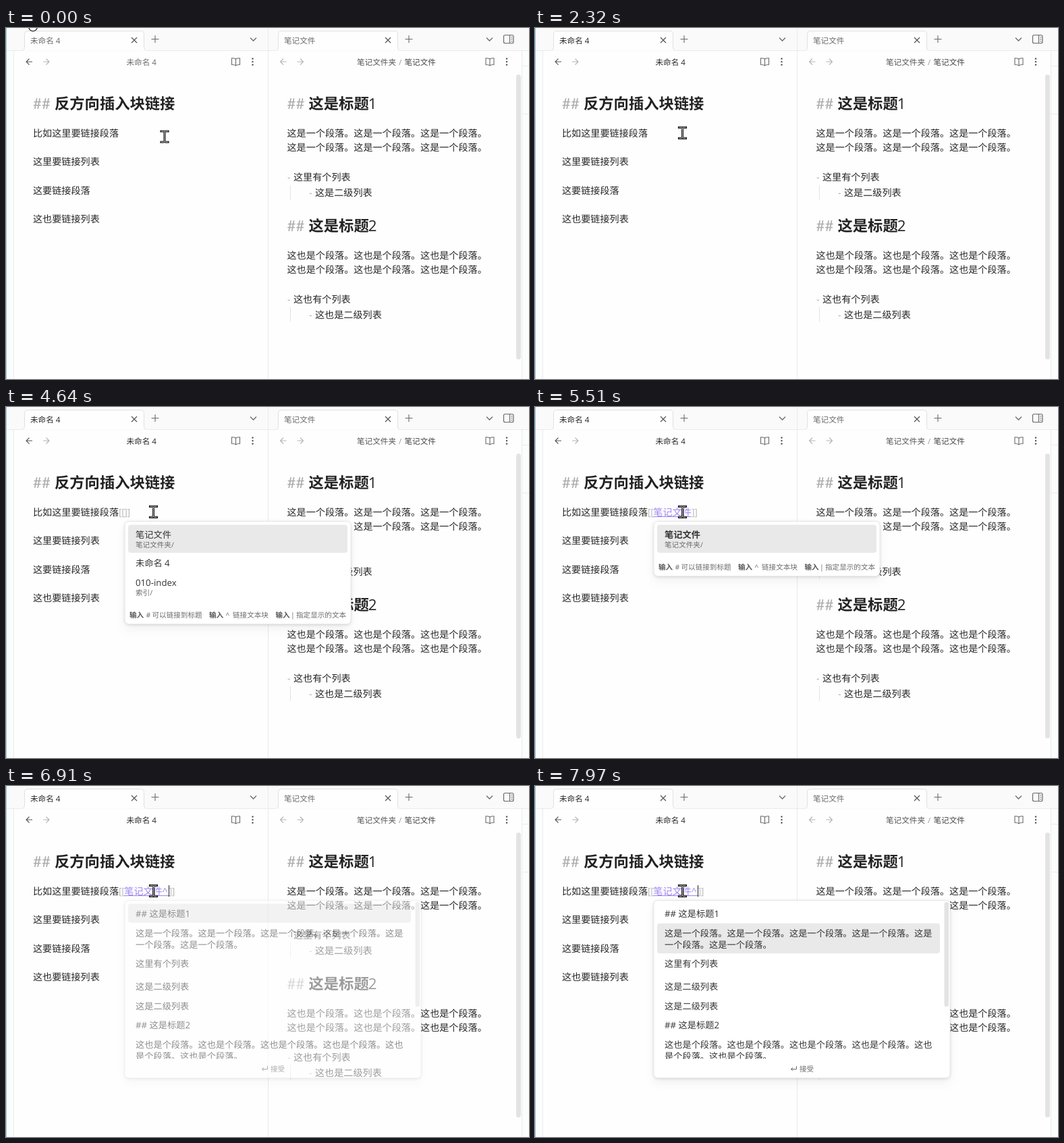
An HTML page that plays this animation: 775x520 px, repeating every 8 s.

```html
<!DOCTYPE html>
<html lang="zh-CN">
<head>
<meta charset="utf-8">
<style>
  html, body { margin: 0; width: 100%; height: 100%; overflow: hidden; background: #fefefe; }
  svg { display: block; width: 775px; height: 520px; }
  text {
    font-family: "Open Sans", "Noto Sans CJK SC", "Noto Sans CJK", sans-serif;
    text-rendering: geometricPrecision; white-space: pre;
  }
  .hash { font-family: Lato, sans-serif; }
  .card { filter: drop-shadow(0 1px 2px #0002) drop-shadow(0 8px 7px #0000000b); }
</style>
</head>
<body>
<svg id="stage" viewBox="0 0 775 520"></svg>
<script>
const stage = document.getElementById('stage');
const LOOP = 8000, INK = '#262626', MUTED = '#6a6a6a', FAINT = '#b4b4b4';

function add(parent, tag, attrs, content = '') {
  const el = document.createElementNS('http://www.w3.org/2000/svg', tag);
  for (const key in attrs) el.setAttribute(key, attrs[key]);
  el.textContent = content;
  return parent.appendChild(el);
}
const group = (parent = stage) => add(parent, 'g', {});
const rect = (parent, x, y, width, height, fill, rx = 0, more = {}) =>
  add(parent, 'rect', { x, y, width, height, fill, rx, ...more });
const line = (parent, d, stroke, width = 1, more = {}) =>
  add(parent, 'path', { d, stroke, 'stroke-width': width, fill: 'none', ...more });
// Text is placed by the vertical centre of its ideographs.
const text = (parent, x, cy, str, size, fill = INK, more = {}) =>
  add(parent, 'text', { x, y: cy + size * 0.37, 'font-size': size, fill, ...more }, str);
const BOLD = { 'font-weight': 600 };

// Window chrome
rect(stage, 0, 0, 775, 33, '#fafafa');
rect(stage, 0, 33, 11, 487, '#fbfcfc');
rect(stage, 765, 33, 10, 487, '#fbfcfc');
line(stage, 'M0 33.5H775M11.5 33V520M388.5 0V520M764.5 33V520M765 56.5H775M765 127.5H775', '#ebebeb');
line(stage, 'M.5 0V520', '#8cc8e4');

function tab(x, title) {
  add(stage, 'path', {
    d: `M${x - 5} 33.5q5 0 5 -5V9.5q0 -5 5 -5H${x + 172}q5 0 5 5V28.5q0 5 5 5`,
    fill: '#fefefe', stroke: '#e0e0e0'
  });
  line(stage, `M${x - 5} 34H${x + 182}`, '#fefefe');
  line(stage, `M${x + 158.5} 14l8 8m0 -8l-8 8`, '#555', 1.2);
  line(stage, `M${x + 188} 16.5h11m-5.5 -5.5v11`, MUTED, 1.1);
  return text(stage, x + 8.5, 18.5, title, 11.6, MUTED);
}

function toolbar(x, backColor) {
  line(stage, `M${x + 9} 50H${x}m4.5 -4.5l-4.5 4.5l4.5 4.5`, backColor, 1.1);
  line(stage, `M${x + 25} 50h9m-4.5 -4.5l4.5 4.5l-4.5 4.5`, FAINT, 1.1);
  line(stage, `M${x + 310.5} 46q-2 -1.5 -6 -1.2v9.5q4 -.3 6 1.5q2 -1.8 6 -1.5v-9.5q-4 -.3 -6 1.2v9.5`, MUTED, 1.1);
  for (const dy of [-4.5, 0, 4.5])
    add(stage, 'circle', { cx: x + 335.5, cy: 50 + dy, r: 1.2, fill: '#555' });
}

const activeTab = tab(27.5, '未命名 4');
tab(403.5, '笔记文件');
for (const x of [362, 712]) line(stage, `M${x} 14.5l4.5 4.5l4.5 -4.5`, MUTED, 1.3);
rect(stage, 737.5, 10.5, 14.5, 12, 'none', 2, { stroke: MUTED, 'stroke-width': 1.2 });
line(stage, 'M746.5 10.5v12M748.5 13.5h2M748.5 16.5h2M748.5 19.5h2', MUTED, 1.1);

toolbar(30, '#555');
toolbar(406.5, FAINT);
const activeTitle = text(stage, 178.5, 51, '未命名 4', 11.6, MUTED);
text(stage, 520, 51, '笔记文件夹', 11.6, '#555');
text(stage, 582, 51, '/', 11.6, '#999');
text(stage, 590.5, 51, '笔记文件', 11.6, '#444');
rect(stage, 756, 69, 7, 422, '#e3e3e3', 3.5);

// Documents
function heading(x, cy, title, number = '') {
  text(stage, x, cy, '##', 22.3, '#ababab', { class: 'hash' });
  const el = text(stage, x + 32, cy, title, 22.3, '#222', BOLD);
  add(el, 'tspan', { 'font-weight': 500, dx: -1 }, number);
}
const BODY = 14.12;
heading(40, 112, '反方向插入块链接');
['比如这里要链接段落', '这里要链接列表', '这要链接段落', '这也要链接列表']
  .forEach((str, i) => text(stage, 40, 156 + i * 42.2, str, BODY));

function section(y, number, sentence, item, subItem) {
  heading(416.5, y, '这是标题', number);
  text(stage, 416.5, y + 44.5, sentence.repeat(3), BODY);
  text(stage, 416.5, y + 65.5, sentence.repeat(3), BODY);
  text(stage, 417, y + 109, '-', BODY, '#aaa');
  text(stage, 426, y + 109, item, BODY);
  line(stage, `M421.5 ${y + 121}v22`, '#e4e4e4');
  text(stage, 449, y + 132, '-', BODY, '#aaa');
  text(stage, 458, y + 132, subItem, BODY);
}
section(111.7, '1', '这是一个段落。', '这里有个列表', '这是二级列表');
section(292.3, '2', '这也是个段落。', '这也有个列表', '这也是二级列表');

// Link being typed
const bracket = x => text(stage, x, 156, '', BODY, '#bbb', { 'letter-spacing': -0.45 });
const opening = bracket(167), closing = bracket(0);
const linkText = text(stage, 175.3, 156, '', BODY, '#9f85f2');
const underline = line(stage, '', '#9f85f2');

// Suggestion cards
function card(width, height) {
  const g = group();
  g.setAttribute('class', 'card');
  rect(g, 176, 169.5, width, height, '#fff', 6, { stroke: '#e8e8e8', 'stroke-width': 1 });
  return g;
}
const highlight = (g, y, width, height) => rect(g, 181, y, width, height, '#e9e9e9', 4);
const option = (g, cy, str, more) => text(g, 192, cy, str, 13.22, '#333', more);
const note = (g, cy, str) => text(g, 192, cy, str, 10.6, MUTED);
function hints(g, cy) {
  [[183, '#', 216.5, '可以链接到标题'], [301, '^', 336, '链接文本块'], [399.5, '|', 430, '指定显示的文本']]
    .forEach(([x, key, labelX, label]) => {
      text(g, x, cy, '输入', 10.55, '#555', BOLD);
      text(g, x + (key === '|' ? 22.5 : 24.5), cy, key, 10.55, MUTED);
      text(g, labelX, cy, label, 10.6, MUTED);
    });
}

const fileCard = card(335, 152);
const fileHighlight = highlight(fileCard, 174.5, 325, 41.5);
option(fileCard, 189, '笔记文件');
note(fileCard, 204.5, '笔记文件夹/');
option(fileCard, 231.5, '未命名 4');
option(fileCard, 260, '010-index');
note(fileCard, 275.5, '索引/');
hints(fileCard, 308);

const matchCard = card(335, 81);
highlight(matchCard, 174.5, 325, 41.5);
option(matchCard, 189, '笔记文件', BOLD);
note(matchCard, 204.5, '笔记文件夹/');
hints(matchCard, 237);

const blockCard = card(439, 263);
const headingHighlight = highlight(blockCard, 174.5, 419, 28);
const paragraphHighlight = highlight(blockCard, 203.5, 419, 44.5);
const clip = add(stage, 'clipPath', { id: 'listClip' });
rect(clip, 176, 170, 439, 234, '#000');
const list = add(blockCard, 'g', { 'clip-path': 'url(#listClip)' });
function paragraph(cy, sentence, lead) {
  option(list, cy, sentence.repeat(4) + lead);
  option(list, cy + 17, sentence.slice(2) + sentence);
}
option(list, 189, '## 这是标题1');
paragraph(218, '这是一个段落。', '这是');
option(list, 263.5, '这里有个列表');
option(list, 297.5, '这是二级列表');
option(list, 326, '这是二级列表');
option(list, 354.5, '## 这是标题2');
paragraph(383.5, '这也是个段落。', '这也');
rect(blockCard, 606.5, 172, 6.5, 155, '#e3e3e3', 3.2);
line(blockCard, 'M387.5 415v4.5h-8m2.5 -2.5l-2.5 2.5l2.5 2.5', MUTED, 1);
text(blockCard, 392, 419, '接受', 10.6, MUTED);

// Caret, pointer and the ring at the top edge
const caret = rect(stage, 0, 147, 1, 17, '#222');
const pointer = group();
const BEAM = 'M-5 -8H-1.5L0 -7L1.5 -8H5M0 -7V7M-5 8H-1.5L0 7L1.5 8H5';
line(pointer, BEAM, '#222', 3.2, { 'stroke-linecap': 'square' });
line(pointer, BEAM, '#b8b8b8', 1);
const ring = add(stage, 'circle', { cx: 40, cy: -1.5, r: 6.2, fill: '#fff', stroke: '#222', 'stroke-width': 1.3 });

// Value of the last [time, value] step that has begun
const step = (t, steps) => steps.reduce((value, [start, next]) => t >= start ? next : value, null);
const show = (el, opacity) => {
  el.style.display = opacity ? '' : 'none';
  el.style.opacity = +opacity;
};

const POINTER = [[0, [235, 161]], [2140, [230, 159]], [2230, [223, 157]], [2320, [218.5, 155.3]]];
const FOCUS = [[0, MUTED], [1610, '#555'], [1700, '#3c3c3c'], [1780, INK]];
const CARET = [[0, 0], [1700, 167], [2230, 0], [2750, 167], [3270, 171], [3700, 175], [4300, 0],
  [4810, 175], [4990, 232], [5510, 0], [6040, 232], [6560, 0], [6910, 241], [7430, 0], [7880, 241]];
const TYPED = [[0, ['', '', 167, '']], [3270, ['[', ']', 171, '']], [3700, ['[[', ']]', 175.3, '']],
  [4990, ['[[', ']]', 232, '笔记文件']], [6910, ['[[', ']]', 241.5, '笔记文件^']]];
const FILE_CARD = [[0, 0], [3700, 0.35], [3790, 0.87], [3870, 1], [4990, 0]];
const BLOCK_CARD = [[0, 0], [6910, 0.55], [7000, 1]];

function draw(t) {
  const [open, close, closeX, link] = step(t, TYPED);
  opening.textContent = open;
  closing.textContent = close;
  closing.setAttribute('x', closeX);
  linkText.textContent = link;
  underline.setAttribute('d', link ? `M175 162.5H${closeX - 0.5}` : '');

  const caretX = step(t, CARET);
  caret.setAttribute('x', caretX);
  show(caret, caretX > 0);
  pointer.setAttribute('transform', `translate(${step(t, POINTER)})`);
  for (const el of [activeTab, activeTitle]) el.setAttribute('fill', step(t, FOCUS));
  show(ring, t < 60);

  show(fileCard, step(t, FILE_CARD));
  show(fileHighlight, t >= 4640);
  show(matchCard, t >= 4990 && t < 6910);
  show(blockCard, step(t, BLOCK_CARD));
  show(headingHighlight, t < 7880);
  show(paragraphHighlight, t >= 7880);
}

const start = performance.now();
(function tick() {
  draw((performance.now() - start) % LOOP);
  requestAnimationFrame(tick);
})();
</script>
</body>
</html>
```
